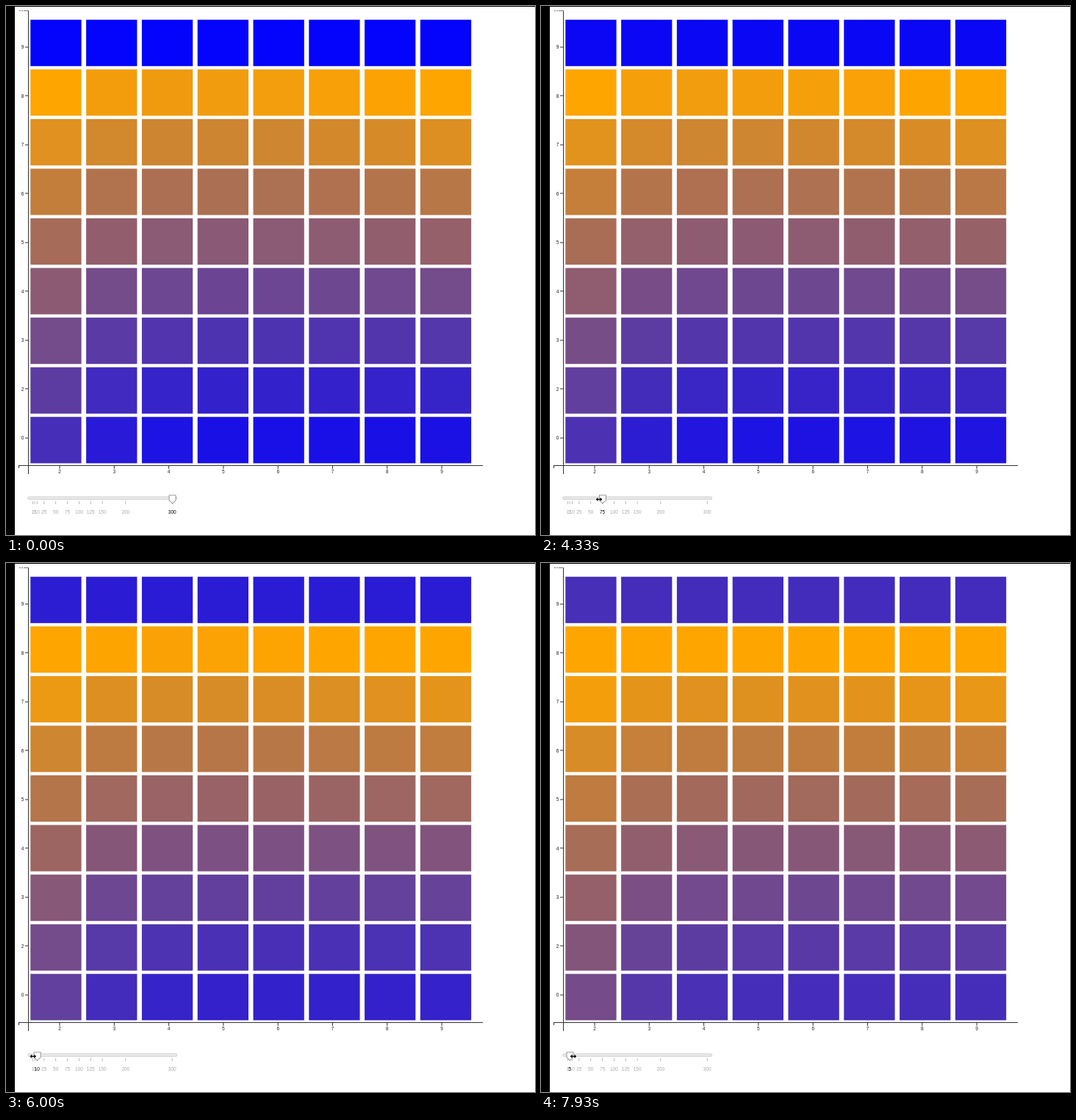
Recreate the animation shown at these times as an HTML page with a canvas. Size 720x720 px, loop 8000 ms.

```html
<!DOCTYPE html>
<html lang="en">
<head>
<meta charset="utf-8">
<title>Heatmap with sample slider</title>
<style>
  html, body { margin: 0; width: 100%; height: 100%; overflow: hidden; background: #fff; }
  canvas { display: block; width: 720px; height: 720px; }
</style>
</head>
<body>
<canvas id="stage"></canvas>
<script>
const LOOP = 8000;
const LAG = 200; // the slider trails the pointer by this many ms
const STOPS = [1, 5, 10, 25, 50, 75, 100, 125, 150, 200, 300];
// Pointer position over time while it drags: [time, x]
const DRAG = [[2130, 202.5], [3130, 143], [4330, 79], [5930, 38], [6330, 31], [7200, 31], [7930, 44]];

const canvas = document.getElementById('stage');
const ctx = canvas.getContext('2d');
const ratio = window.devicePixelRatio || 1;
canvas.width = canvas.height = 720 * ratio;
ctx.scale(ratio, ratio);

const clamp = v => Math.min(1, Math.max(0, v));
const mix = (a, b, k) => a + (b - a) * k;
const progress = (t, start, end) => clamp((t - start) / (end - start));
const easeOut = k => 1 - (1 - k) ** 2.4;
const slot = value => 36 + value * 0.634;

function pointerX(t) {
  if (t < 1270) return mix(219, 229.5, easeOut(progress(t, 130, 800)));
  if (t < 2130) return mix(229.5, 202.5, easeOut(progress(t, 1270, 1930)));
  const next = DRAG.findIndex(([time]) => time > t);
  if (next < 0) return DRAG[DRAG.length - 1][1];
  const [start, from] = DRAG[next - 1];
  const [end, to] = DRAG[next];
  return mix(from, to, progress(t, start, end));
}

function sliderValue(t) {
  const x = pointerX(t - LAG);
  const gap = value => Math.abs(slot(value) - x);
  return STOPS.reduce((best, value) => gap(value) < gap(best) ? value : best);
}

// Heat falls row by row, is higher at both ends of a row, and rises as samples get few.
function heatAt(samples, row, col) {
  const few = samples ** -0.69;
  const left = (0.06 + 0.017 * row) * Math.exp(-col);
  if (row === 0) return few * (0.8 + left);
  const middle = 0.92 - 0.121 * (row - 1) - 0.04 * Math.sin(Math.PI * (row - 1) / 7);
  const right = (0.1 - 0.01 * row) * (1 - few) * (col / 7) ** 2;
  const lift = few * (0.22 + 0.0055 * row ** 2);
  return clamp(middle + left + right + lift);
}

function rect(x, y, w, h, color) {
  ctx.fillStyle = color;
  ctx.fillRect(x, y, w, h);
}

function text(label, x, y, color, align = 'center') {
  ctx.fillStyle = color;
  ctx.textAlign = align;
  ctx.fillText(label, x, y);
}

function polygon(x, y, points, fill, stroke, width) {
  ctx.beginPath();
  points.forEach(([dx, dy]) => ctx.lineTo(x + dx, y + dy));
  ctx.closePath();
  ctx.strokeStyle = stroke;
  ctx.lineWidth = width;
  ctx.stroke();
  ctx.fillStyle = fill;
  ctx.fill();
}

function roundLine(x1, x2, y, width, color) {
  ctx.beginPath();
  ctx.moveTo(x1, y);
  ctx.lineTo(x2, y);
  ctx.lineCap = 'round';
  ctx.lineWidth = width;
  ctx.strokeStyle = color;
  ctx.stroke();
}

function drawCells(samples) {
  for (let row = 0; row < 9; row++) {
    for (let col = 0; col < 8; col++) {
      const h = heatAt(samples, row, col);
      const color = `rgb(${255 * h}, ${165 * h}, ${255 * (1 - h)})`;
      rect(33.3 + col * 75.8, 18.7 + row * 67.57, 69.3, 63.1, color);
    }
  }
}

function drawAxes() {
  const ink = '#333';
  rect(30, 6, 1, 631, ink);
  rect(17, 625, 632, 1, ink);
  rect(17, 625, 1, 4, ink);
  for (let x = 18; x < 26; x += 3) rect(x, 6, 2, 1, '#777');
  rect(26, 6, 5, 1, '#777');
  for (let i = 0; i < 9; i++) {
    const y = 55.7 + i * 66.5;
    rect(26, Math.round(y) - 0.5, 4, 1, ink);
    text(i < 8 ? 9 - i : 0, 24.3, y + 2.4, '#222', 'right');
  }
  for (let i = 0; i < 8; i++) {
    const x = 73 + i * 74.3;
    rect(x - 0.5, 626, 1, 4, ink);
    text(i + 2, x, 635.5, '#222');
  }
}

function drawSlider(value) {
  roundLine(31.5, 231, 669.7, 4.4, '#ccc');
  roundLine(31.5, 231, 669.7, 3, '#e8e8e8');
  for (const stop of STOPS) {
    rect(slot(stop) - 0.4, 674, 0.8, 4, '#aaa');
    if (stop !== value) text(stop, slot(stop), 691, '#aaa');
  }
  text(value, slot(value), 691, '#000');
  const handle = [[-3.8, -3.5], [4.4, -3.5], [4.4, 3], [0.3, 6.8], [-3.8, 3]];
  polygon(slot(value), 669.7, handle, '#fff', '#777', 1.5);
}

function drawPointer(t) {
  if (t < 130) return;
  const x = pointerX(t);
  const y = mix(720, 671.5, easeOut(progress(t, 130, 800)));
  if (y > 677) {
    const arrow = [[0, 0], [0, 10], [2.3, 8], [4, 11.5], [5.5, 10.8], [4, 7.4], [7, 7.2]];
    polygon(x, y, arrow, '#000', '#fff', 1);
  } else {
    const half = [[-4.3, 0], [-1.5, -2.8], [-1.5, -0.7], [1.5, -0.7], [1.5, -2.8]];
    polygon(x, y, half.concat(half.map(([dx, dy]) => [-dx, -dy])), '#000', '#fff', 0.9);
  }
}

function draw(t) {
  const value = sliderValue(t);
  rect(0, 0, 720, 720, '#fff');
  rect(0, 0, 12, 720, '#000');
  rect(0, 0, 720, 1, '#000');
  ctx.font = '6.5px "Liberation Sans", Arial, sans-serif';
  drawCells(value);
  drawAxes();
  drawSlider(value);
  drawPointer(t);
}

const begin = performance.now();
function tick() {
  draw((performance.now() - begin) % LOOP);
  requestAnimationFrame(tick);
}
tick();
</script>
</body>
</html>
```
